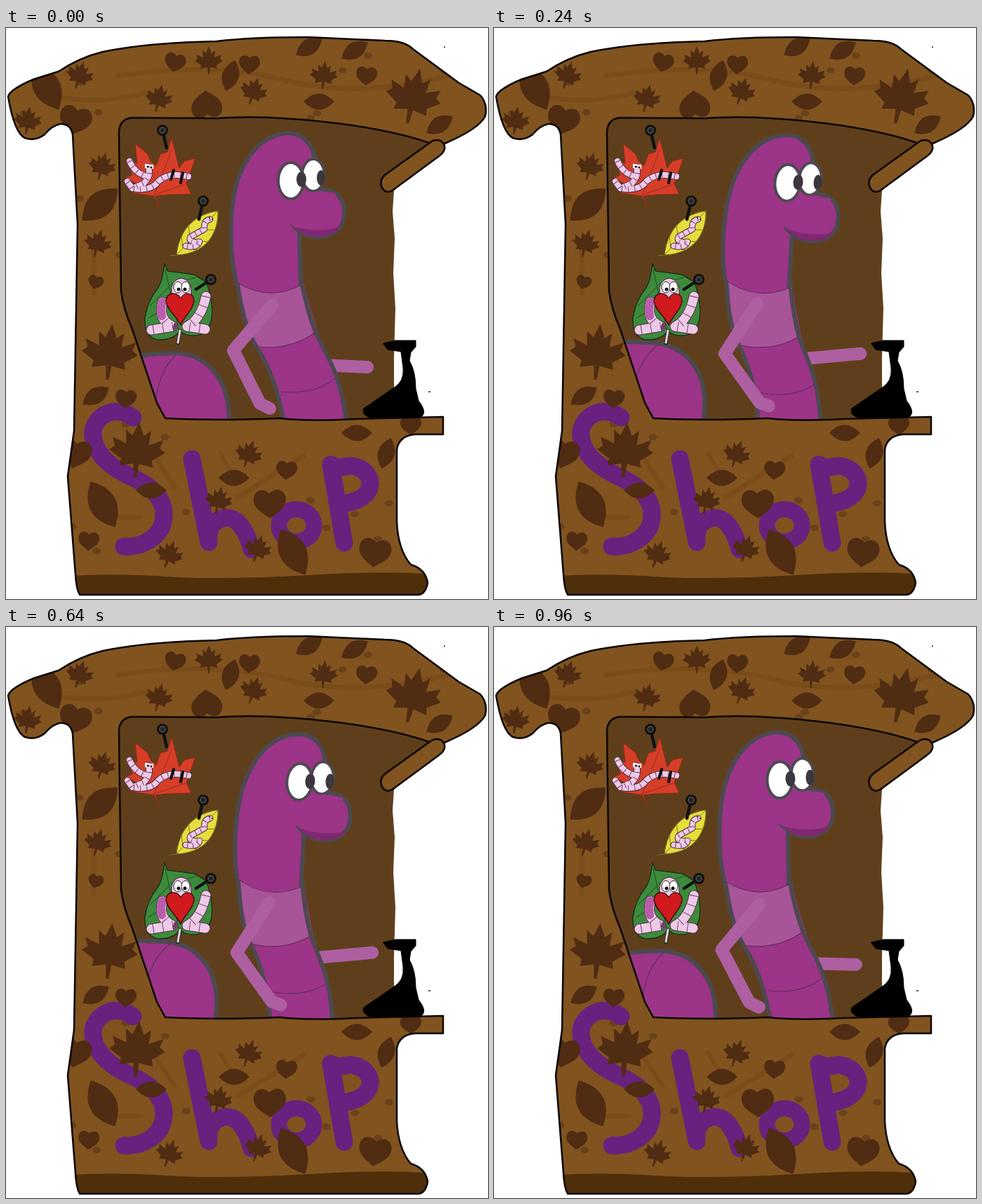
Recreate the animation shown at these times as an HTML page. Size 687 by 815 pixels, loop 1000 ms.

```html
<!DOCTYPE html>
<html lang="en">
<head>
<meta charset="utf-8">
<title>Worm shop</title>
<style>
html, body { margin: 0; width: 100%; height: 100%; overflow: hidden; background: #fff; }
svg { display: block; }
path, line, polyline { stroke-linecap: round; stroke-linejoin: round; }
.line { fill: none; }
.rim { fill: none; stroke: #4d4950; stroke-width: 6; }
.seam { fill: none; stroke: #63305c; stroke-width: 1.2; }
.skin { fill: #9c3488; }
.arm { fill: none; stroke: #ae5fa1; stroke-width: 18; }
.ink { fill: none; stroke: #0b0704; stroke-width: 2.5; }
</style>
</head>
<body>
<svg width="687" height="815" viewBox="0 0 687 815">
  <defs>
    <path id="booth" d="M3 98Q6 87 40 73L75 62Q105 42 138 34Q200 21 300 19Q350 13 430 13L540 18Q568 18 580 30L645 78 676 96Q687 108 683 126Q674 144 625 165H606Q560 148 480 137Q370 123 300 129L180 128Q161 130 161 150L164 375Q167 400 180 430L215 535 227 557Q300 561 390 557Q430 562 500 558L623 555V580H583Q560 582 557 602V705Q559 745 577 766Q598 772 601 792Q598 808 588 809H105Q100 800 99 780L88 640 97 575 102 280 95 152Q92 136 77 137Q66 139 55 152Q42 162 27 157Q12 150 3 98Z"/>
    <clipPath id="clip"><use href="#booth"/></clipPath>
    <path id="maple" d="M0-20L4-10 9-14 8-4 18-8 16-2 20 1 11 7 12 12 2 10 1 20-1 20-2 10-12 12-11 7-20 1-16-2-18-8-8-4-9-14-4-10Z"/>
    <path id="heart" d="M0 20C-9 13-21 8-20-5C-18-17-7-18 0-11C7-18 18-17 20-5C21 8 9 13 0 20Z"/>
    <path id="oval" d="M-20 0Q0-21 20 0Q0 21-20 0Z"/>
    <g id="pin">
      <circle r="8" fill="#111"/>
      <circle r="4" fill="#222" stroke="#555" stroke-width="1.5"/>
    </g>
  </defs>

  <path fill="#5f3f1b" d="M155 125H480L610 165 553 232 551 262 554 300 552 350 555 400 553 470V560H220L160 400Z"/>

  <line id="backArm" class="arm"/>
  <g id="body">
    <path id="tail" class="skin" d="M150 473Q215 463 245 464C290 468 318 505 318 557V610H150"/>
    <use href="#tail" class="rim"/>
    <path class="rim" d="M150 473Q215 463 245 464C290 468 318 505 318 557V610"/>
    <path class="seam" d="M243 466Q219 488 214 530"/>
    <path class="skin" d="M328 350C335 395 340 428 357 455C380 490 395 535 402 610H488C487 550 478 508 462 476Q441 434 421 350Z"/>
    <path fill="#a85499" d="M328 350C335 395 340 428 357 455Q405 460 441 434Q428 400 421 350Z"/>
    <path class="rim" d="M328 355C335 395 340 428 357 455C380 490 395 535 402 610M421 360Q428 400 441 434L462 476C478 508 487 550 488 610"/>
    <path class="seam" d="M359 455Q405 460 440 435M392 519Q440 524 469 500"/>
  </g>
  <g id="head">
    <path class="skin" d="M328 362C319 325 315 250 335 205C350 170 375 150 405 150C430 152 440 175 440 192L445 232C465 228 482 238 482 265C482 290 460 300 440 298Q427 297 418 291L420 366Q375 391 328 362Z"/>
    <path class="rim" d="M328 362C319 325 315 250 335 205C350 170 375 150 405 150C430 152 440 175 440 192M445 232C465 228 482 238 482 265C482 290 460 300 440 298Q427 297 418 291L420 366"/>
    <path fill="#7f2872" d="M408 283Q440 293 478 284Q466 298 443 298Q420 297 408 283Z"/>
    <path class="seam" d="M329 363Q375 391 420 367"/>
    <path class="line" stroke="#4d4950" stroke-width="2.5" d="M407 282Q413 290 420 292"/>
    <g fill="#fff" stroke="#4d4950" stroke-width="4">
      <ellipse cx="438" cy="210" rx="16" ry="23"/>
      <ellipse cx="406" cy="218" rx="18" ry="26"/>
    </g>
    <g fill="#3b373d">
      <ellipse cx="421" cy="216" rx="7" ry="11"/>
      <ellipse cx="449" cy="214" rx="6" ry="11"/>
    </g>
    <path class="skin" d="M415 250Q420 234 448 233L470 236 468 258 430 268Z"/>
  </g>
  <polyline id="foreArm" class="arm"/>

  <use href="#booth" fill="#80531f"/>
  <g clip-path="url(#clip)">
    <path class="line" stroke="#774916" stroke-width="7" opacity=".65" d="M70 98Q140 110 200 92M160 68Q300 48 400 75T640 66M125 300V380M305 608L325 640M330 670L425 610M208 605L240 655M140 698H192"/>
    <g id="spots" fill="#69421a"></g>
    <path fill="#4f2e0a" d="M95 782Q150 778 230 783T430 781T605 780V815H95Z"/>
    <path class="line" stroke="#68217f" stroke-width="25" d="M181 556C158 539 131 549 124 574C122 600 140 622 175 639C210 654 227 674 225 699C223 726 194 742 168 740M265 615L289 734Q286 704 313 699Q337 698 350 744M463 623L482 735M465 628L492 625C528 629 533 675 477 679"/>
    <ellipse class="line" stroke="#68217f" stroke-width="23" cx="414" cy="710" rx="25" ry="23"/>
    <g id="leaves" fill="#502c12"></g>
  </g>
  <use href="#booth" class="ink"/>
  <path fill="#80531f" stroke="#0b0704" stroke-width="2.5" d="M608 161Q621 157 625 168Q627 176 617 183L552 231Q542 238 536 228Q531 217 541 209Z"/>
  <path stroke="#000" d="M538 450L555 446H584V455L577 463 575 475Q584 490 584 515L588 532Q602 550 590 556H519Q506 552 510 543L552 514Q568 505 566 485L563 462 544 459Z"/>
  <path fill="#222" d="M624 26.500h2v1.500h-2zM602 518.500h3v1.500h-3z"/>

  <!-- red leaf -->
  <path fill="#d63e27" stroke="#8a2a1b" d="M236 157L247 200 254 190 270 186 263 205 257 222 264 237 230 238 213 240 220 260 211 240 180 235 194 226 170 214 180 210 173 190 187 193 184 165 202 180 206 190 214 197 220 180 230 177Z"/>
  <path class="line" stroke="#9d2d1d" d="M211 240L237 172M212 238L258 222"/>
  <g class="worm" data-width="8">
    <path d="M203 198Q207 212 196 222L180 229 173 219M182 229Q207 233 217 219Q231 205 260 212M176 190Q183 206 198 211"/>
  </g>
  <path class="line" stroke="#111" stroke-width="4" d="M239 203L235 216M252 207L249 221"/>
  <path fill="#fff" d="M198 194h5v6h-5zM205 195h5v6h-5z"/>
  <path class="line" stroke="#111" stroke-width="3" d="M202 198h0M207 199h0"/>

  <!-- yellow leaf -->
  <path fill="#e6de3b" stroke="#6d6820" d="M302 261C303 290 288 322 243 324C246 295 262 267 302 261Z"/>
  <path class="line" stroke="#7d7722" d="M234 325L243 324 302 261M252 314L250 297M263 302L260 281M253 314L274 317M263 303L288 305M276 289L298 288"/>
  <g class="worm" data-width="7">
    <path d="M291 273Q281 275 283 287L263 298Q259 307 276 305Q273 315 256 311"/>
  </g>
  <path class="line" stroke="#222" stroke-width="2" d="M290 271h0M294 273h0"/>

  <!-- green leaf -->
  <path fill="#3d8a3c" stroke="#17351a" stroke-width="1.5" d="M226 336L230 347Q247 349 268 352L285 362Q296 388 293 415Q288 437 270 439Q255 440 248 432Q239 446 215 445Q197 440 198 415Q201 390 216 372Q223 362 226 336Z"/>
  <path class="line" stroke="#1f4d23" d="M227 345L247 433M232 370L206 396M238 394L203 414M235 366L270 356"/>
  <path class="line" stroke="#17351a" stroke-width="5" d="M248 432L245 450"/>
  <path class="line" stroke="#efc9e8" stroke-width="3" d="M248 432L245 449"/>
  <g class="worm" data-width="13">
    <path d="M223 391Q216 416 238 426L207 431M285 383Q278 416 258 426L284 430"/>
  </g>
  <path class="line" stroke="#b95dac" stroke-width="12" stroke-linecap="butt" d="M223 391Q219 401 222 411"/>
  <path fill="#efc9e8" stroke="#33202f" d="M236 384V370Q239 358 250 357Q262 359 264 371V388Z"/>
  <g fill="#fff" stroke="#222">
    <ellipse cx="245" cy="370" rx="6" ry="8"/>
    <ellipse cx="256" cy="370" rx="6" ry="8"/>
  </g>
  <path class="line" stroke="#111" stroke-width="5" d="M246 373h0M255 373h0"/>
  <path fill="#d01a1d" stroke="#391014" stroke-width="1.5" d="M249 424C243 411 230 403 228 390C229 376 244 376 249 386C254 376 268 377 268 390C266 404 254 411 249 424Z"/>

  <path class="line" stroke="#111" stroke-width="4.5" d="M223 146L229 171M281 247L275 273M292 359L271 373"/>
  <use href="#pin" x="223" y="146"/>
  <use href="#pin" x="281" y="247"/>
  <use href="#pin" x="292" y="359"/>
</svg>
<script>
const $ = id => document.getElementById(id);

function leaf(kind, x, y, size, turn) {
  $("leaves").innerHTML +=
    `<use href="#${kind}" transform="translate(${x} ${y}) rotate(${turn}) scale(${size / 20})"/>`;
}
// leaves of one kind and size; without a given turn each tilts a little by its place
function scatter(kind, size, points, turn) {
  for (const [x, y] of points) leaf(kind, x, y, size, turn ?? (x + y) % 30 - 5);
}
scatter("maple", 40, [[581, 97], [148, 462], [187, 602]]);
scatter("maple", 20, [[105, 67], [31, 132], [218, 100], [289, 46], [353, 90], [453, 67],
  [346, 608], [303, 674], [359, 743], [233, 751]]);
scatter("heart", 23, [[99, 130], [376, 677], [526, 747], [99, 606]]);
scatter("heart", 15, [[241, 48], [347, 51], [514, 67], [171, 528], [400, 630], [118, 731], [577, 566]]);
scatter("heart", 22, [[286, 111]], 175);
scatter("oval", 37, [[58, 84], [138, 680], [409, 748]], 62);
scatter("oval", 22, [[446, 105], [325, 642], [500, 578], [207, 660]], 0);
scatter("oval", 22, [[432, 27], [497, 32], [618, 138], [128, 525]], -32);
scatter("oval", 23, [[320, 68], [542, 607]], 107);
// a column down the post
["maple", "oval", "maple", "heart"].forEach((kind, i) =>
  leaf(kind, 137 - 3 * i, 197 + 55 * i, [20, 34, 20, 11][i], kind == "oval" ? -42 : 15));

let seed = 7;
const random = () => (seed = seed * 16807 % 2147483647) / 2147483647;
for (let i = 0; i < 110; i++) {
  $("spots").innerHTML +=
    `<ellipse cx="${random() * 687}" cy="${20 + random() * 750}" rx="6" ry="4.5"/>`;
}

// small worms: dark edge, pink skin, dashes across as rings
for (const worm of document.querySelectorAll(".worm")) {
  const d = worm.firstElementChild.getAttribute("d"), w = +worm.dataset.width;
  const coat = (color, width, extra = "") =>
    `<path d="${d}" fill="none" stroke="${color}" stroke-width="${width}" ${extra}/>`;
  worm.innerHTML = coat("#4a3045", w + 2) + coat("#efc9e8", w) +
    coat("#704066", w, `style="stroke-linecap:butt" stroke-dasharray="1 ${w}"`);
}

function draw(now) {
  const t = Math.floor(now % 1000 / 40) * 40;
  const lean = t < 400 ? t / 400 : (1000 - t) / 600;
  const mix = (a, b) => a + (b - a) * lean;
  const turn = (id, deg) => $(id).setAttribute("transform", `rotate(${deg * lean} 375 375)`);

  turn("head", 7.6);
  turn("body", 9.8);
  const back = { x1: mix(450, 427), y1: mix(481, 467), x2: mix(515, 527), y2: mix(484, 452) };
  for (const k in back) $("backArm").setAttribute(k, back[k]);
  $("foreArm").setAttribute("points", [
    mix(379, 372), mix(396, 391), mix(324, 332), mix(460, 468),
    mix(362, 390), mix(536, 534), mix(376, 402), mix(543, 537)
  ].join(" "));
  requestAnimationFrame(draw);
}
draw(performance.now());
</script>
</body>
</html>
```
